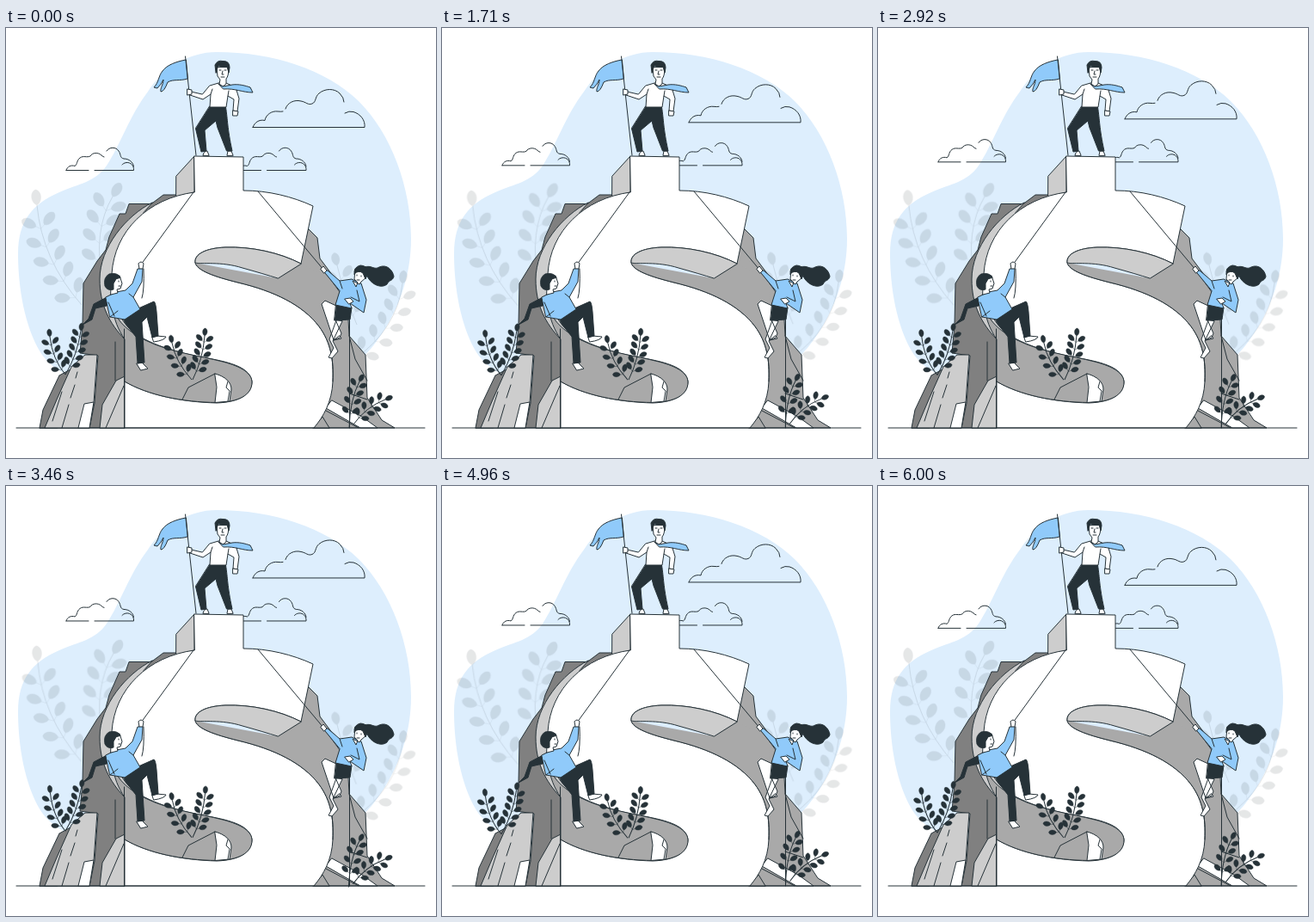
Write an HTML page that moves like this. It is 500 by 500 pixels and loops after 6.04 s.

```html
<!DOCTYPE html>
<html lang="en">
<head>
<meta charset="utf-8">
<title>Climbers</title>
<style>
html, body { margin: 0; width: 100%; height: 100%; overflow: hidden; background: #fff; }
svg { display: block; width: 100vw; height: 100vh; }
.ink { stroke: #263238; stroke-width: 1; stroke-linejoin: round; stroke-linecap: round; fill: none; }
.dark { fill: #263238; }
.white { fill: #fff; }
.blue { fill: #90cafa; }
.g1 { fill: #808080; }
.g2 { fill: #a9a9a9; }
.g3 { fill: #cdcdcd; }
</style>
</head>
<body>
<svg viewBox="0 0 500 500">
  <path fill="#ddeefd" d="M245 28C310 28 372 48 410 85C448 123 471 185 471 245C471 290 455 335 425 372C400 400 370 425 240 425C120 425 62 412 40 377C22 347 14 303 14 262C14 225 30 205 62 191C85 181 104 179 117 160C133 136 143 103 165 74C182 47 212 28 245 28Z"/>

  <g id="clouds" class="ink">
    <path d="M287 115.5H417C418 107 412 100 404 97.500Q399 96 394 99M287 115.500C289 110 294 106 301 107.500C302 101 309 96 316 97Q320 97.500 322 97M325 94C327 87 335 83 343 85C349 86 351 90 356 88C361 86 359 80 364 76C371 70 382 70 388 76Q393 81 393 86"/>
    <path id="puff" d="M70 165.500H96M103 165.500H148.500C149 160 145 156 140 156.500C137 157 136 158 135 159M70 165.500C71 161 76 159 80 160.500C83 159 82 154 86 151C90 148 94 151 98 149C100 145 107 144 111 148Q113 150 114 150M117 143C120 138 128 138 131 143C134 147 132 151 137 152C143 152 148 156 148.500 161"/>
    <use href="#puff" x="200.500"/>
  </g>

  <g id="backPlants" fill="#263238" stroke="#263238" opacity=".125"></g>

  <!-- rocks -->
  <g class="ink">
    <path class="g1" d="M198 194H183L169 204.500H143L139 216H132L120 243L116 258L106 271L90 297L89 345L86 378L107 381L103 436L97 465H138V350L219 191Z"/>
    <path class="g1" d="M39 465L43 444L62 404L75 397L92 381L60 465Z"/>
    <path class="g3" d="M45 465L59 432L76 394L92 380H106L102 436L97 465Z"/>
    <path class="white" d="M84 465L91 437L102 435L97 465Z"/>
    <path d="M83 400L81 407M80 415L75 430M73 438L65 465M65 423L54 457"/>
    <path class="g3" d="M109 465L112 438L128 410L138 405V465Z"/>
    <path d="M127 365V410M116 465L137 416"/>
    <path class="g2" d="M352 234L362 244L365 268L380 288L397 318L399 358L418 380L420 430L437 456L452 465H358L300 330Z"/>
    <path d="M399 358L406 385L420 410M399 425L420 432"/>
    <path class="white" d="M379 433L414 452L432 465H412L372 442Z"/>
    <path d="M372 445L410 465"/>
    <path class="g2" d="M357 465L368 452L376 465Z"/>
  </g>

  <!-- dollar monument -->
  <g class="ink">
    <path class="g3" d="M198 172L219 149V191L198 196Z"/>
    <path class="g3" d="M170 203C140 218 109 255 109 292C109 322 120 343 138 362L160 350V215Z"/>
    <path class="white" d="M219 149L276 150V189C305 189 333 196 357 207L343 274C318 261 285 254 255 255C232 256 219 263 220 272C221 282 242 289 270 296C312 306 345 322 364 347C378 366 381 386 380 411C379 435 369 452 358 465H138V411C165 427 205 435 245 436C273 435 286 425 286 411C284 395 262 389 235 384C200 378 162 367 144 350C128 334 122 311 123 286C126 236 165 198 219 191Z"/>
    <path class="g2" d="M124 325C129 342 144 354 162 363C190 377 225 381 252 388C275 394 286 402 286 412C286 427 270 435 245 435.500C205 435 165 427 138 411V362C130 350 126 340 124 325Z"/>
    <path class="white" d="M243 402C255 405 262 412 262 420L260 434L243 435.500L245 418Z"/>
    <path d="M258 411L256 418L260 422L258 434M205 432L212 418L243 402"/>
    <path class="g2" d="M220 273C222 282 242 289 270 296C312 306 345 322 364 347Q376 363 379 384L383 375L380 292L343 274L316 291Z" stroke="none"/>
    <path d="M220 273C222 282 242 289 270 296C312 306 345 322 364 347C378 366 381 386 380 411"/>
    <path class="g3" d="M343 274C318 261 285 254 255 255C232 256 219 263 220 273C227 275 250 271 275 279Q300 286 316 291Z"/>
  </g>

  <path class="ink" d="M12 465H487M137.500 350V465M399.500 330V465M218 191L157 275M293 190L370 282L396 318"/>

  <g id="frontPlants" class="dark" stroke="#263238"></g>

  <!-- leader with flag -->
  <g class="ink">
    <path class="blue" d="M209 37C198 39 187 43 182 50C177 56 178 63 172 69L176 70Q181 65 183 60C183 66 179 70 180 74Q184 74 188 63C195 59 202 62 211 59Z"/>
    <path d="M208.500 33L221 148"/>
    <path class="white" d="M229 148Q230 143 234 143L236 148ZM257 148L258 143H262L264 148Z"/>
    <path class="dark" d="M237 91L255.500 92C258 108 257 115 263 143H256.500L246 116L244 108L231 119L233 143L227 144L220.500 117Z"/>
    <path class="white" d="M237 67L247 64H256L267 69L271 82L269 97L264 96L265 83L258 79L256 92H237L238 77L229 83L214 78L215 74L228 77Z"/>
    <path class="white" d="M211 71L216 72V77L211 78ZM264 96L270 97L269 102L264 102Z"/>
    <path class="white" d="M245 46L246 56L249 60L248 65L252 68L256 65V59Q259 56 259 46Z"/>
    <path class="dark" d="M244 52L243 43Q246 37 252 38.500Q260 38 260 46L259 52L257 45Q252 46 247 44Z"/>
    <path d="M248 49H250M254 49H256M252 50L251 54H253M250 57H254M238 77L240 71M258 79L259 73"/>
    <path class="blue" d="M247 65L252 68L263 66C271 65 278 67 284 69L287 75C275 75 267 70 253 71Z"/>
  </g>

  <!-- climber in trousers -->
  <g class="ink">
    <path class="dark" d="M121 311L102 321L96 338L89 345L100 339L104 326L117 323Z"/>
    <path class="white" d="M170 359L175 358L186 359Q185 363 172 365ZM152 390L158 389L165 396L157 398Z"/>
    <path class="dark" d="M136 337L154 326L172 318Q174 319 175 330L177 358L170 360L164 336L158 342L161 389L153 390L151 359L139 344Z"/>
    <path class="white" d="M155 280L154 274Q157 270 160 274L159 280Z"/>
    <path class="blue" d="M116 313L128 307L139 305L147 297L153 280H159L158 295L148 313L156 327L138 339L121 336Z"/>
    <path d="M160 280Q161 305 158 314M148 313L143 309M119 319L126 335M121 336L130 329"/>
    <path class="white" d="M123 289L132 288L135 297L133 303L129 304L130 308L122 310Z"/>
    <path class="dark" d="M133 290Q130 284 120 286Q113 290 115 300Q118 306 125 304V297L128 292Z"/>
    <path d="M131 294V295M131 300H133"/>
  </g>

  <!-- climber in skirt -->
  <g class="ink">
    <path class="dark" d="M417 278C425 275 428 282 434 278C443 274 450 282 451 289C449 295 446 292 443 298C437 303 427 299 422 292C419 288 419 283 417 278Z"/>
    <path class="white" d="M384 323L371 317L367 321L375 345L381 363L388 360L390 355L382 337L395 339ZM381 363L390 361L388 358ZM384 340L376 362L381 372L375 383L379 384L386 376L380 364L391 341Z"/>
    <path class="dark" d="M384 320L402 325L400 339L382 340Z"/>
    <path class="blue" d="M369 282L374 282L388 294L402 292L413 297L419 316L416 331L400 320L402 326L383 322L388 306Z"/>
    <path d="M388 294L391 303M408 305L411 318L401 313"/>
    <path class="white" d="M366 280L369 277L373 282L370 285ZM394 315L400 314L404 318L399 321Z"/>
    <path class="white" d="M406 281L405 292L409 296L407 301L403 294L411 298L413 295L419 290L418 281Z"/>
    <path class="dark" d="M405 286Q404 278 412 276Q420 276 421 284L418 292L415 285Q410 281 405 286Z"/>
    <path d="M408 287V288M413 288V289M408 293H411"/>
  </g>
</svg>
<script>
const LOOP = 6040;
const byId = id => document.getElementById(id);

function add(parent, d, attrs) {
  const el = document.createElementNS('http://www.w3.org/2000/svg', 'path');
  el.setAttribute('d', d);
  for (const k in attrs) el.setAttribute(k, attrs[k]);
  parent.append(el);
}

// A curved stem with paired leaves and one leaf at the tip
function plant(parent, [x0, y0, x1, y1, x2, y2], pairs, len, from, to) {
  add(parent, `M${x0} ${y0}Q${x1} ${y1} ${x2} ${y2}`, { fill: 'none', 'stroke-width': 1 });
  const w = len * 0.4;
  const leaf = (x, y, angle, stalk) => add(parent,
    `M0 0H${stalk}C${stalk + len * 0.2} ${-w} ${stalk + len * 0.9} ${-w} ${stalk + len} 0` +
    `C${stalk + len * 0.9} ${w} ${stalk + len * 0.2} ${w} ${stalk} 0`,
    { transform: `translate(${x} ${y}) rotate(${angle})`, 'stroke-width': 0.4 });
  const at = t => {
    const u = 1 - t;
    const dx = u * (x1 - x0) + t * (x2 - x1), dy = u * (y1 - y0) + t * (y2 - y1);
    return [u * u * x0 + 2 * u * t * x1 + t * t * x2,
            u * u * y0 + 2 * u * t * y1 + t * t * y2,
            Math.atan2(dy, dx) * 180 / Math.PI];
  };
  for (let i = 0; i < pairs; i++) {
    const [x, y, a] = at(from + (to - from) * i / (pairs - 1));
    leaf(x, y, a - 52, len * 0.35);
    leaf(x, y, a + 52, len * 0.35);
  }
  const [x, y, a] = at(1);
  leaf(x, y, a, 0);
}

const back = byId('backPlants'), front = byId('frontPlants');
plant(back, [88, 322, 42, 270, 36, 206], 5, 18, 0.08, 0.78);
plant(back, [112, 295, 101, 235, 124, 196], 4, 18, 0.2, 0.8);
plant(back, [404, 386, 455, 350, 461, 297], 5, 15, 0.1, 0.82);
plant(back, [408, 345, 393, 310, 385, 276], 3, 15, 0.15, 0.75);

plant(front, [69, 403, 54, 385, 51, 359], 4, 9, 0.15, 0.8);
plant(front, [69, 403, 83, 380, 87, 352], 5, 9, 0.2, 0.86);
plant(front, [216, 409, 197, 388, 193, 366], 4, 9, 0.15, 0.8);
plant(front, [217, 409, 229, 385, 231, 358], 5, 9, 0.2, 0.86);
plant(front, [399, 465, 400, 432, 411, 411], 4, 9, 0.25, 0.84);
plant(front, [404, 461, 418, 441, 441, 432], 4, 9, 0.2, 0.82);

// Linear swing: 0, 1, 0, -1, 0
function swing(p) {
  return p < 0.25 ? p * 4 : p < 0.75 ? 2 - p * 4 : p * 4 - 4;
}

function draw(now) {
  const p = (now % LOOP) / LOOP;
  const lift = 10 * (1 - Math.abs(1 - 2 * p));
  const angle = swing(p * 2 % 1);
  byId('clouds').setAttribute('transform', `translate(0 ${-lift})`);
  back.setAttribute('transform', `rotate(${angle} 245 282)`);
  front.setAttribute('transform', `rotate(${angle} 246 406)`);
}

let start;
function tick(now) {
  start ??= now;
  draw(now - start);
  requestAnimationFrame(tick);
}
draw(0);
requestAnimationFrame(tick);
</script>
</body>
</html>
```
